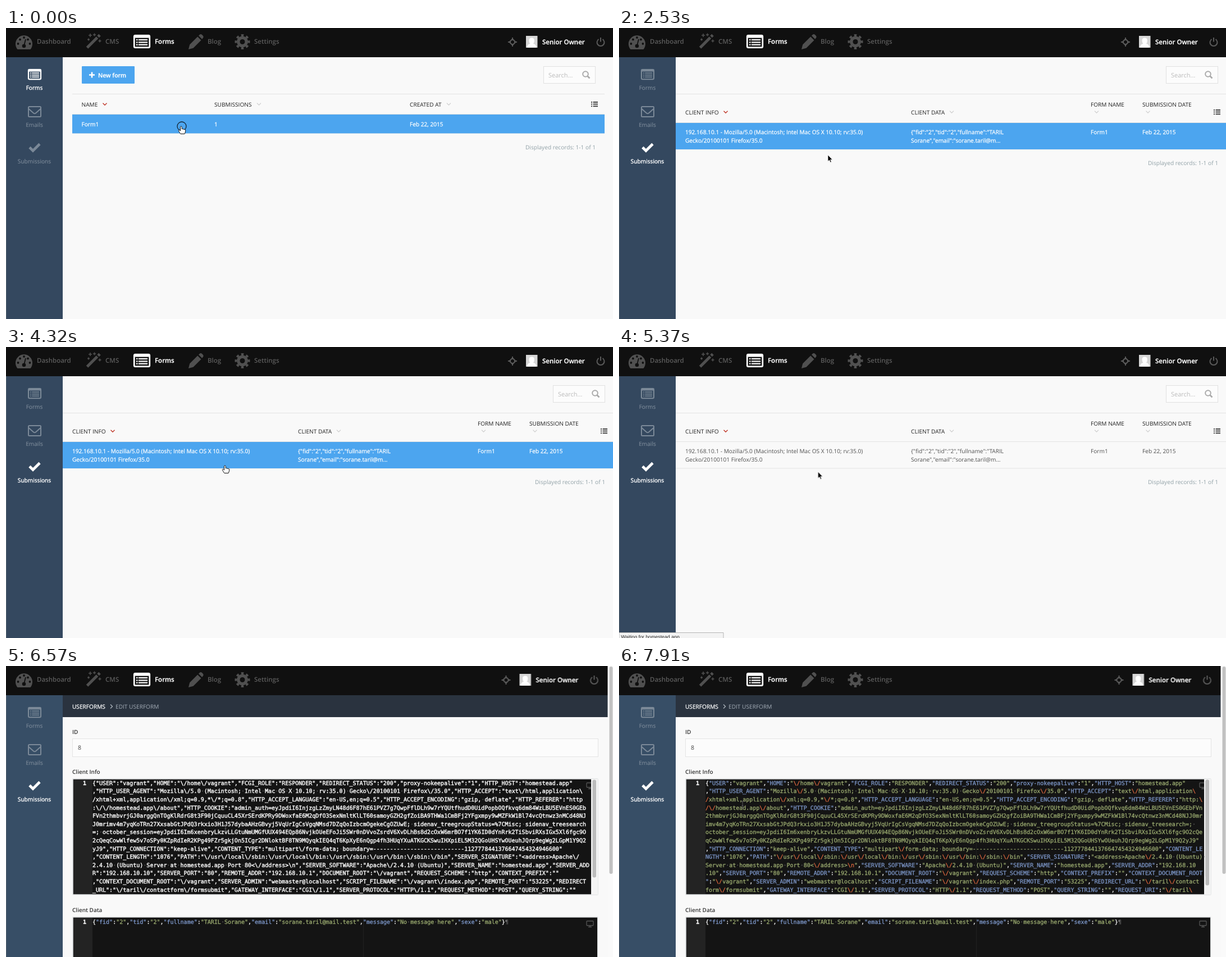
Recreate the animation shown at these times as an HTML page. Size 1081 px wide and 518 px high, loop 8 s.

```html
<!DOCTYPE html>
<html lang="en">
<head>
<meta charset="utf-8">
<title>Form submissions</title>
<style>
html, body { margin: 0; width: 100%; height: 100%; overflow: hidden; background: #f9f9f9; }
svg { display: block; width: 100%; height: 100%; }
text { white-space: pre; text-rendering: geometricPrecision; }
.ui { font: 10.15px "Open Sans", sans-serif; }
.nav { font-size: 11.5px; font-weight: 600; fill: #5c5c5c; color: #505050; }
.side { fill: #7b8998; color: #7b8998; stroke: #7b8998; stroke-width: .15; text-anchor: middle; }
.white { fill: #fff; color: #fff; stroke: #fff; stroke-width: .25; }
.head { fill: #222; }
.cell { fill: #505050; }
.note { fill: #91a1a7; }
.label { fill: #333; font-weight: 600; font-size: 10px; }
.rule { stroke: #e3e3e3; fill: none; }
.chev { fill: none; stroke: #ccc; stroke-width: 1.1; }
.chev.red { stroke: #c0392b; stroke-width: 1.4; }
.bar text { font: 8.75px "Liberation Sans", Arial, sans-serif; fill: #222; }
.code { font: 10px "DejaVu Sans Mono", monospace; fill: #f8f8f8; stroke: #f8f8f8; stroke-width: .3; }
.code .k { fill: #7d97c9; stroke: #7d97c9; }
.code .s { fill: #9bab70; stroke: #9bab70; }
.code .e { fill: #e0693f; stroke: #e0693f; }
.code .d { fill: #777; stroke: none; }
#plain { stroke-width: .45; }

/* Everything shares one 8 s clock; timed parts are hidden unless their keyframes show them. */
.timed { opacity: 0; animation: 8s step-end -10ms infinite; }
#account { animation: account 8s step-end -10ms infinite; }
#cursor { animation: move 8s -10ms infinite; }
@keyframes formsPage { 0% { opacity: 1 } 18.625% { opacity: 0 } }
@keyframes listPage { 18.625% { opacity: 1 } 80.25% { opacity: 0 } }
@keyframes editPage { 80.25%, 100% { opacity: 1 } }
@keyframes account { 80.25%, 100% { transform: translate(-11.5px, 0) } }
@keyframes sideHot { 7.5%, 100% { opacity: 1 } }
@keyframes formHot { 0% { opacity: 1 } 3.75% { opacity: 0 } }
@keyframes listHot { 26.125% { opacity: 1 } 33.5% { opacity: 0 } 48.375% { opacity: 1 } 67.125% { opacity: 0 } }
@keyframes link { 7.5% { opacity: 1 } 15% { opacity: 0 } }
@keyframes waiting { 15% { opacity: 1 } 18.625% { opacity: 0 } 61.5% { opacity: 1 } 72.75% { opacity: 0 } }
@keyframes transfer { 72.75% { opacity: 1 } 80.25% { opacity: 0 } }
@keyframes raw { 80.25% { opacity: 1 } 84% { opacity: 0 } }
@keyframes tinted { 84%, 100% { opacity: 1 } }
@keyframes ring { 0% { opacity: 1 } 1.875% { opacity: 0 } 61.5% { opacity: 1 } 65.25% { opacity: 0 } }
@keyframes hand {
  0% { opacity: 1 } 3.75% { opacity: 0 } 7.5% { opacity: 1 } 20.5% { opacity: 0 }
  26.125% { opacity: 1 } 29.75% { opacity: 0 } 48.375% { opacity: 1 } 67.125% { opacity: 0 }
}
@keyframes arrow {
  3.75% { opacity: 1 } 7.5% { opacity: 0 } 20.5% { opacity: 1 } 26.125% { opacity: 0 }
  29.75% { opacity: 1 } 48.375% { opacity: 0 } 67.125% { opacity: 1 } 74.625% { opacity: 0 }
}
@keyframes beam { 74.625% { opacity: 1; stroke: #222 } 80.25%, 100% { opacity: 1; stroke: #5a5a5a } }
@keyframes move {
  0% { transform: translate(313px, 175px); animation-timing-function: steps(5) }
  9.375% { transform: translate(38px, 232px) }
  16.75% { transform: translate(38px, 232px); animation-timing-function: steps(5) }
  26.125% { transform: translate(250px, 205px); animation-timing-function: steps(3) }
  31.625% { transform: translate(372px, 226px); animation-timing-function: steps(4) }
  39% { transform: translate(384px, 252px); animation-timing-function: steps(4) }
  46.5% { transform: translate(392px, 213px); animation-timing-function: steps(4) }
  54% { transform: translate(391px, 211px); animation-timing-function: steps(3) }
  59.625% { transform: translate(335px, 193px) }
  63.375% { transform: translate(335px, 193px); animation-timing-function: steps(7) }
  76.5% { transform: translate(403px, 295px) }
  78.375% { transform: translate(403px, 295px); animation-timing-function: steps(2) }
  82.125% { transform: translate(391px, 288px); animation-timing-function: steps(6) }
  93.25% { transform: translate(208px, 252px); animation-timing-function: steps(2) }
  97% { transform: translate(212px, 236px); animation-timing-function: steps(1) }
  98.875%, 100% { transform: translate(220px, 247px) }
}
</style>
</head>
<body>
<svg viewBox="0 0 1081 518" class="ui">
<defs>
  <path id="form" fill="currentColor" fill-rule="evenodd" d="M3 0h24a3 3 0 0 1 3 3v18a3 3 0 0 1-3 3H3a3 3 0 0 1-3-3V3a3 3 0 0 1 3-3zM2.5 5.5V21.5h25V5.5zM5 8h2.4v2H5zM9 8h16v2H9zM5 12.4h2.4v2H5zM9 12.4h16v2H9zM5 16.8h2.4v2H5zM9 16.8h16v2H9z"/>
  <path id="down" d="M-3.5-1.8 0 1.7 3.5-1.8"/>
  <path id="list" fill="#444" d="M0 0h2v2H0zM3.5 0H12v2H3.5zM0 3.6h2v2H0zM3.5 3.6H12v2H3.5zM0 7.2h2v2H0zM3.5 7.2H12v2H3.5z"/>
  <g id="search">
    <rect x=".5" y=".5" width="92" height="30" fill="#fcfcfc" stroke="#e1e1e1"/>
    <text x="9" y="19.5" font-size="11" fill="#bbb">Search...</text>
    <g fill="none" stroke="#aaa" stroke-width="2"><circle cx="75" cy="14" r="4.8"/><path d="M78.5 17.5l4 4" stroke-width="2.6"/></g>
  </g>
  <g id="screen" fill="none" stroke="#555" stroke-width="1.3"><rect width="12" height="8" rx="1"/><path d="M3 10.5h6M6 8v2"/></g>
  <g id="sideForms"><use href="#form" transform="translate(39 73) scale(.8)"/><text x="50.5" y="110">Forms</text></g>
  <g id="sideSubs"><path d="M42 212.5l6 6 12-12" fill="none" stroke="currentColor" stroke-width="4.6"/><text x="50.5" y="240.5">Submissions</text></g>
  <g id="formRow"><text x="134.5" y="175">Form1</text><text x="371" y="175">1</text><text x="719" y="175">Feb 22, 2015</text></g>
  <g id="listRow">
    <text x="118" y="188.5">192.168.10.1 - Mozilla/5.0 (Macintosh; Intel Mac OS X 10.10; rv:35.0)</text>
    <text x="118" y="203.5">Gecko/20100101 Firefox/35.0</text>
    <text x="520" y="188.5">{"fid":"2","tid":"2","fullname":"TARIL</text>
    <text x="520" y="203.5">Sorane","email":"sorane.taril@m...</text>
    <text x="840" y="188.5">Form1</text><text x="932" y="188.5">Feb 22, 2015</text>
  </g>
</defs>

<rect width="1081" height="518" fill="#f9f9f9"/>
<rect width="1081" height="52" fill="#101010"/>

<g class="nav">
  <g fill="currentColor">
    <path d="M20.5 38A15 15 0 1 1 43.5 38z"/>
    <g fill="#101010"><circle cx="21.5" cy="28" r="1.9"/><circle cx="25" cy="20.5" r="1.9"/><circle cx="32" cy="17" r="1.9"/><circle cx="39" cy="20.5" r="1.9"/><circle cx="42.5" cy="28" r="1.9"/><circle cx="32" cy="32" r="3.3"/></g>
    <path d="M32 32l3-12" stroke="#101010" stroke-width="1.8"/>
    <path d="M144.5 35l18-18M164 15.5l3-3" stroke="currentColor" stroke-width="5"/>
    <path d="M150 10v6M147 13h6M157.5 9.5v5M155 12h5M147 18.5v4M145 20.5h4M167 20.5v5M164.5 23h5" stroke="currentColor" stroke-width="1.6"/>
    <path d="M325 38l2.2-8.5 14-14 6.3 6.3-14 14zM343 13.7l2-2q2-1.6 4 .2l2 2.2q1.4 1.8 0 3.6l-2 2z"/>
    <circle cx="421" cy="24.5" r="10"/>
    <circle cx="421" cy="24.5" r="11.5" fill="none" stroke="currentColor" stroke-width="4" pathLength="16" stroke-dasharray="1" stroke-dashoffset=".5"/>
    <circle cx="421" cy="24.5" r="4.5" fill="#101010"/>
  </g>
  <text x="55" y="28">Dashboard</text>
  <text x="177" y="28">CMS</text>
  <g class="white"><use href="#form" x="227" y="12"/><text x="265" y="28">Forms</text></g>
  <text x="359" y="28">Blog</text>
  <text x="442" y="28">Settings</text>
  <g id="account">
    <path d="M902 19.5l5.5 5.5-5.5 5.5-5.5-5.5zM902 17v5M902 28v5M894 25h5M905 25h5" fill="none" stroke="#5a5a5a" stroke-width="2"/>
    <rect x="926" y="14" width="20.5" height="21" fill="#d6d6d6"/>
    <path d="M928 35q0-6 5.5-7-2-2-2-5.5 0-5 4.7-5t4.7 5q0 3.5-2 5.5 5.6 1 5.6 7z" fill="#fff"/>
    <text x="955" y="29" class="white">Senior Owner</text>
    <path d="M1055.5 20a6.5 6.5 0 1 0 7 0M1059 17v7.5" fill="none" stroke="#5a5a5a" stroke-width="2"/>
  </g>
</g>

<rect y="52" width="101" height="466" fill="#34485f"/>
<rect class="timed" style="animation-name:editPage" y="52" width="101" height="466" fill="#374e66"/>
<rect y="52" width="1" height="466" fill="#56636f"/>
<g class="side">
  <use href="#sideForms"/>
  <path d="M40 141.5q0-1.5 1.5-1.5h19q1.5 0 1.5 1.5v15q0 1.5-1.5 1.5h-19q-1.5 0-1.5-1.5zM40.5 144l8.5 7.5q2 1.5 4 0l8.5-7.5" fill="none" stroke="currentColor" stroke-width="2"/>
  <text x="50.5" y="175.5">Emails</text>
  <use href="#sideSubs"/>
  <g class="white">
    <use href="#sideForms" class="timed" style="animation-name:formsPage"/>
    <use href="#sideSubs" class="timed" style="animation-name:sideHot"/>
  </g>
</g>

<g class="timed" style="animation-name:formsPage">
  <rect x="135" y="68" width="94" height="31" rx="1" fill="#4ca5ef"/>
  <path d="M148 83.5h10M153 78.5v10" stroke="#fff" stroke-width="2.6"/>
  <text x="164" y="87.5" class="white" font-size="10.5" font-weight="600">New form</text>
  <use href="#search" x="957" y="68"/>
  <path class="rule" d="M118 117.5h948M118 153.5h948M118 187.5h948"/>
  <g class="head"><text x="134.5" y="139.5">NAME</text><text x="371" y="139.5">SUBMISSIONS</text><text x="719" y="139.5">CREATED AT</text></g>
  <use href="#down" class="chev red" x="176" y="135.5"/><use href="#down" class="chev" x="450.5" y="135.5"/><use href="#down" class="chev" x="788.5" y="135.5"/>
  <use href="#list" x="1042" y="131"/>
  <use href="#formRow" class="cell"/>
  <g class="timed" style="animation-name:formHot"><rect x="118" y="154" width="948" height="33.5" fill="#4ca5ef"/><use href="#formRow" class="white"/></g>
  <text x="1050" y="215.5" class="note" text-anchor="end">Displayed records: 1-1 of 1</text>
</g>

<g class="timed" style="animation-name:listPage">
  <use href="#search" x="974" y="68"/>
  <path class="rule" d="M101 117.5h980M101 168.5h980M101 216h980"/>
  <g class="head"><text x="118" y="153.5">CLIENT INFO</text><text x="520" y="153.5">CLIENT DATA</text><text x="840" y="139.5">FORM NAME</text><text x="932" y="139.5">SUBMISSION DATE</text></g>
  <use href="#down" class="chev red" x="190" y="149.5"/><use href="#down" class="chev" x="592.5" y="149.5"/><use href="#down" class="chev" x="850.5" y="149.5"/><use href="#down" class="chev" x="942" y="149.5"/>
  <use href="#list" x="1059" y="145"/>
  <use href="#listRow" class="cell"/>
  <g class="timed" style="animation-name:listHot"><rect x="101" y="169" width="980" height="47" fill="#4ca5ef"/><use href="#listRow" class="white"/></g>
  <text x="1067" y="244" class="note" text-anchor="end">Displayed records: 1-1 of 1</text>
</g>

<g class="timed" style="animation-name:editPage">
  <rect x="101" y="52" width="971" height="39" fill="#2a333f"/>
  <text x="118" y="75.5" class="white">USERFORMS</text>
  <path d="M186 68.5l3.5 3.5-3.5 3.5" fill="none" stroke="#aeb6be" stroke-width="1.3"/>
  <text x="195" y="75.5" fill="#a3acb6">EDIT USERFORM</text>
  <rect x="1071.5" width="9.5" height="518" fill="#fafafa"/>
  <rect x="1074.5" y="1" width="6" height="369" rx="3" fill="#c1c1c1"/>
  <g class="label"><text x="118" y="121">ID</text><text x="118" y="192">Client Info</text><text x="118" y="438">Client Data</text></g>
  <rect x="118.5" y="129.5" width="936" height="32" fill="#fcfcfc" stroke="#e4e4e4"/>
  <text x="128" y="149" fill="#444" font-size="10.5">8</text>
  <g fill="#141414" stroke="#e2e4e5" stroke-width="1.8"><rect x="118.9" y="200.9" width="935" height="206.2" rx="1"/><rect x="118.9" y="446.9" width="935" height="80" rx="1"/></g>
  <path d="M120 202h34v204h-34zM120 448h34v70h-34z" fill="#232323"/>
  <path d="M636.5 202v204M636.5 448v70" stroke="#202020"/>
  <use href="#screen" x="1034" y="208"/><use href="#screen" x="1034" y="454"/>
  <rect x="1042" y="201" width="12" height="206" fill="#f4f4f4"/>
  <rect x="1044.5" y="202.5" width="6.5" height="174" rx="3" fill="#bcbcbc"/>
  <rect class="timed" style="animation-name:tinted" x="1044.5" y="202.5" width="6.5" height="188" rx="3" fill="#bcbcbc"/>
  <g class="code">
    <g font-weight="700"><text x="137" y="212">1</text><text x="137" y="459">1</text></g>
    <g id="plain" class="timed" style="animation-name:raw"></g>
    <g id="tinted" class="timed" style="animation-name:tinted"></g>
    <g id="data"></g>
  </g>
</g>

<g class="bar">
  <g class="timed" style="animation-name:link"><path d="M0 518v-9.5h213.5v9.5" fill="#f3f3f3" stroke="#b5b5b5"/><text x="3.5" y="518.5">homestead.app/backend/taril/contactform/userforms</text></g>
  <g class="timed" style="animation-name:waiting"><path d="M0 518v-9.5h186v9.5" fill="#f3f3f3" stroke="#b5b5b5"/><text x="3.5" y="518.5">Waiting for homestead.app...</text></g>
  <g class="timed" style="animation-name:transfer"><path d="M0 518v-9.5h186v9.5" fill="#f3f3f3" stroke="#b5b5b5"/><text x="3.5" y="518.5">Transferring data from homestead.app...</text></g>
</g>

<g id="cursor">
  <circle class="timed" style="animation-name:ring" r="8" fill="none" stroke="#14222e" stroke-width="1.3"/>
  <path class="timed" style="animation-name:hand" d="M-2.5 1.5Q-2.5 0-1.2 0T.2 1.5V5l1.3-.5 1.2.8 1.4-.3 1 .9 1.2.1.5 1.5-.7 3.5-1 2.5H-2.2L-4.8 9.5-5.8 7.3-4.6 6.2-2.5 8z" fill="#fff" stroke="#111" stroke-width="1"/>
  <path class="timed" style="animation-name:arrow" d="M0 0V11.5l2.6-2.4 1.8 4.1 1.9-.8-1.8-4h3.6z" fill="#000" stroke="#fff" stroke-width=".7"/>
  <path class="timed" style="animation-name:beam" d="M-2.5-6H-1L0-5 1-6H2.5M0-5V5M-2.5 6H-1L0 5 1 6H2.5M-1.5 1.5h3" fill="none" stroke="#222" stroke-width="1.1"/>
</g>
</svg>
<script>
// "~" marks a line break before highlighting, "^" one after it; "#n#" stands for n token characters.
const request = String.raw`
{"USER":"vagrant","HOME":"\/home\/vagrant","FCGI_ROLE":"RESPONDER","REDIRECT_STATUS":"200",
"proxy-nokeepalive":"1","HTTP_HOST":"homestead.app"~^
,"HTTP_USER_AGENT":"Mozilla\/5.0 (Macintosh; Intel Mac OS X 10.10; rv:35.0) Gecko\/20100101 Firefox\/35.0",
"HTTP_ACCEPT":"text\/html,application\~^/xhtml+xml,application\/xml;q=0.9,*\/*;q=0.8",
"HTTP_ACCEPT_LANGUAGE":"en-US,en;q=0.5","HTTP_ACCEPT_ENCODING":"gzip, deflate",
"HTTP_REFERER":"http~:\^/\/homestead.app\/about",
"HTTP_COOKIE":"admin_auth=eyJpdiI6In#83#~#3#^#143#~#4#^#89#; sidenav_treegroupStatus=%7CMisc; 
sidenav_treesearch~=; ^october_session=eyJpdiI6Im#117#~#4#^#142#~yJ9"^
,"HTTP_CONNECTION":"keep-alive","CONTENT_TYPE":"multipart\/form-data; 
boundary=---------------------------1127778441376647454324946600"~,"CONTENT_LE^NGTH":"1076",
"PATH":"\/usr\/local\/sbin:\/usr\/local\/bin:\/usr\/sbin:\/usr\/bin:\/sbin:\/bin",
"SERVER_SIGNATURE":"<address>Apache\/~2.4.10 (Ubuntu) ^Server at homestead.app Port 80<\/address>\n",
"SERVER_SOFTWARE":"Apache\/2.4.10 (Ubuntu)","SERVER_NAME":"homestead.app","SERVER_ADD~R":"192.168.10^.10",
"SERVER_PORT":"80","REMOTE_ADDR":"192.168.10.1","DOCUMENT_ROOT":"\/vagrant","REQUEST_SCHEME":"http",
"CONTEXT_PREFIX":""~,"CONTEXT_DOCUMENT_ROOT^":"\/vagrant","SERVER_ADMIN":"webmaster@localhost",
"SCRIPT_FILENAME":"\/vagrant\/index.php","REMOTE_PORT":"53225",
"REDIRECT~_URL":"\/taril\/contact^form\/formsubmit","GATEWAY_INTERFACE":"CGI\/1.1",
"SERVER_PROTOCOL":"HTTP\/1.1","REQUEST_METHOD":"POST","QUERY_STRING":""~,"REQUEST_URI":"\/taril\^/contactform"`;
const answer = '{"fid":"2","tid":"2","fullname":"TARIL Sorane","email":"sorane.taril@mail.test","message":"No message here","sexe":"male"}¶';

const letters = 'ABCDEFGHIJKLMNOPQRSTUVWXYZabcdefghijklmnopqrstuvwxyz0123456789';
let seed = 7;
function token(length) {
  let out = '';
  while (out.length < length) {
    seed = (seed * 16807) % 2147483647;
    out += letters[seed % letters.length];
  }
  return out;
}

function draw(id, source, breakMark, top, highlight) {
  const text = source.replace(/[~^]/g, '');
  const kinds = Array(text.length).fill('');
  const mark = (pattern, kind) => {
    for (const m of text.matchAll(pattern)) kinds.fill(kind, m.index, m.index + m[0].length);
  };
  if (highlight) {
    mark(/"[^"]*"/g, 's');
    mark(/"[^"]*"(?=:)/g, 'k');
    mark(/\\./g, 'e');
  }
  mark(/[ ¶]/g, 'd');

  const lines = [[]];
  let i = 0;
  for (const c of source) {
    if (c === breakMark) lines.push([]);
    if (c === '~' || c === '^') continue;
    const runs = lines[lines.length - 1], last = runs[runs.length - 1];
    const shown = c === ' ' ? '·' : c === '<' ? '&lt;' : c;
    if (last && last.kind === kinds[i]) last.text += shown;
    else runs.push({ kind: kinds[i], text: shown });
    i++;
  }
  document.getElementById(id).innerHTML = lines.slice(0, 14).map((runs, row) =>
    `<text x="154" y="${top + row * 14.6}">` +
    runs.map(r => `<tspan class="${r.kind}">${r.text}</tspan>`).join('') + '</text>').join('');
}

const body = request.replace(/\n/g, '').replace(/#(\d+)#/g, (_, n) => token(+n));
draw('plain', body, '~', 211.7, false);
draw('tinted', body, '^', 211.7, true);
draw('data', answer, '~', 458.7, true);
</script>
</body>
</html>
```
